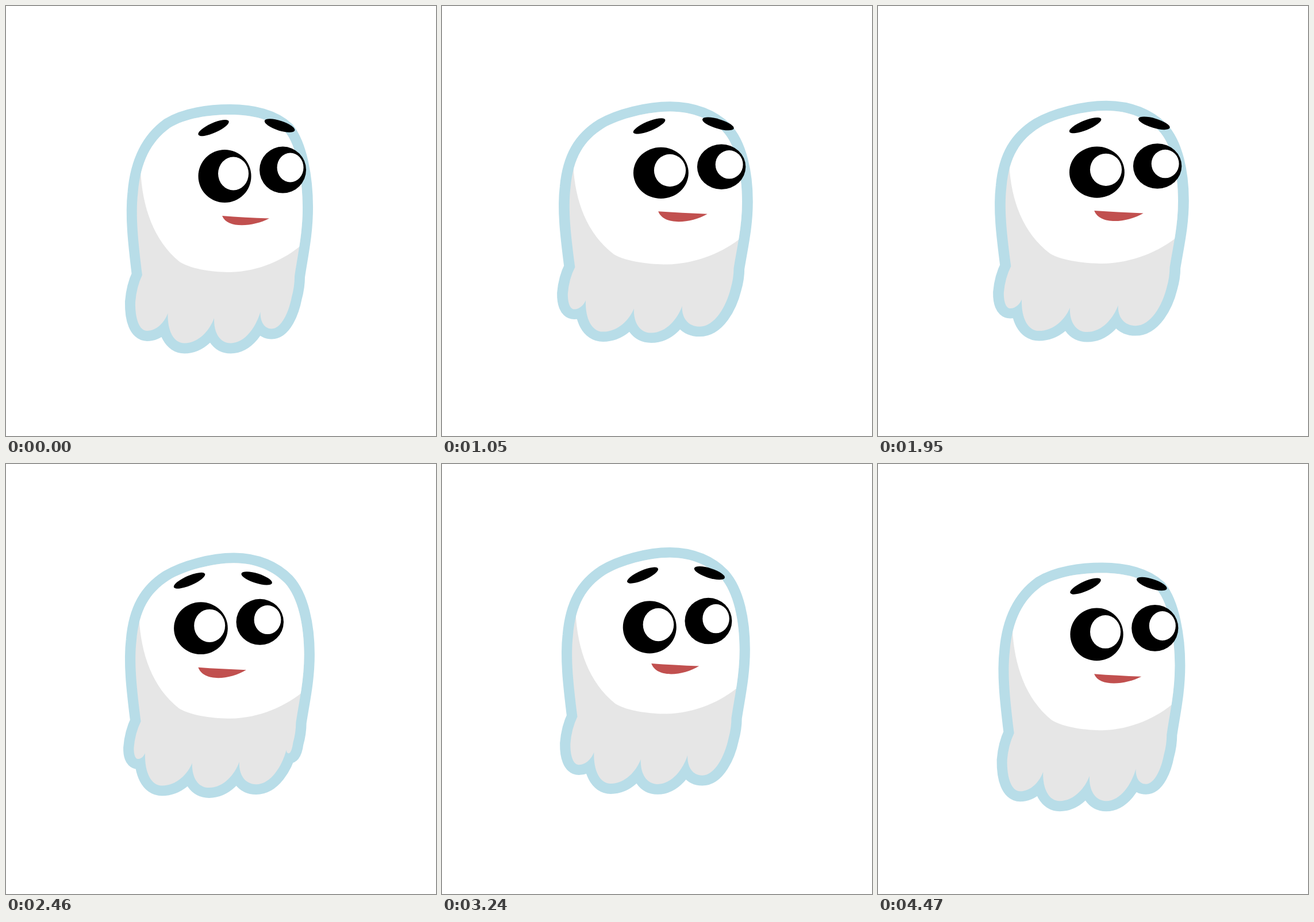
Animation of 748 by 748 pixels, one loop 4500 ms. Source, as an HTML page with a canvas:

```html
<!DOCTYPE html>
<html lang="en">
<head>
<meta charset="utf-8">
<title>Ghost</title>
<style>
html, body { margin: 0; width: 100%; height: 100%; overflow: hidden; background: #fff; }
canvas { display: block; width: 748px; height: 748px; }
</style>
</head>
<body>
<canvas id="stage" width="748" height="748"></canvas>
<script>
const ctx = document.getElementById('stage').getContext('2d');
const LOOP = 4500, STEP = 30;
const CENTER = 372, BASE = 573;
const BLUE = '#b8dde8', GRAY = '#e6e6e6', RED = '#c1504f';
const LANDINGS = [-15, 885, 1755, 2695, 3585, 4485, 5385];
const LEFT = [225, 515], RIGHT = [497, 506];

const mix = (a, b, u) => a + (b - a) * u;
const ease = (t, start, length) => {
  const u = Math.min(1, Math.max(0, (t - start) / length));
  return u * u * (3 - 2 * u);
};

// Height above the lowest point: one arc between each pair of landings.
function bounce(t) {
  const i = LANDINGS.findIndex((end, n) => n && t < end);
  const from = LANDINGS[i - 1];
  return 33 * Math.sin(Math.PI * (t - from) / (LANDINGS[i] - from)) - 1.7;
}

const squash = t => (1 - Math.cos(2 * Math.PI * (t + 8) / 300)) / 2;

// 0 = looking right, 1 = looking towards the middle.
const glance = (t, lag) => ease(t, 2040 + lag, 360) - ease(t, 3007 + lag, 360);

const cuspY = x => 543 - 0.0015 * (x - 357) ** 2;
const hemY = x => 588 - 0.0005 * (x - 350) ** 2 - 1.1e-7 * (x - 350) ** 4;

function hemPoints(t) {
  const points = [LEFT];
  const first = 362 - 80 * (t % 450) / 450;
  for (let k = -2; k <= 3; k++) {
    const x = first + 80.5 * k;
    if (x > LEFT[0] + 1 && x < RIGHT[0] - 1) points.push([x, cuspY(x)]);
  }
  points.push(RIGHT);
  return points;
}

// One scallop, traced from its right cusp to its left one.
function scallop([x0, y0], [x1, y1]) {
  const w = x1 - x0, xb = x0 + 0.36 * w;
  const yb = Math.min(hemY(xb), Math.max(y0, y1) + 0.54 * w);
  ctx.bezierCurveTo(x1 - 0.09 * w, mix(y1, yb, 0.47), xb + 0.31 * w, yb, xb, yb);
  ctx.bezierCurveTo(xb - 0.23 * w, yb, x0 - 0.01 * w, mix(y0, yb, 0.6), x0, y0);
}

// The head is flat-topped on landing (round = 0) and rounder in the air.
function bodyPath(t, round) {
  const leftY = mix(212, 219, round), top = 189;
  const peak = mix(390, 396, round);
  const rightX = mix(485, 483, round), rightY = mix(218, 224, round);
  ctx.beginPath();
  ctx.moveTo(237, 468);
  ctx.bezierCurveTo(230, 410, 225, 365, 229.5, 325);
  ctx.bezierCurveTo(234, 272, 252, mix(236, 241, round), 285, leftY);
  ctx.bezierCurveTo(312, leftY - 17, peak - 36, top, peak, top);
  ctx.bezierCurveTo(peak + 39, top, 464, rightY - 20, rightX, rightY);
  ctx.bezierCurveTo(506, rightY + 26, 516, 300, 516, 350);
  ctx.bezierCurveTo(516, 395, 508, 430, 502, 470);
  ctx.quadraticCurveTo(502, 488, ...RIGHT);
  const points = hemPoints(t);
  for (let i = points.length - 1; i > 0; i--) scallop(points[i - 1], points[i]);
  ctx.quadraticCurveTo(227, 489, 237, 468);
  ctx.closePath();
}

function drawBody(t, round) {
  bodyPath(t, round);
  ctx.lineWidth = 36;
  ctx.lineJoin = 'round';
  ctx.strokeStyle = BLUE;
  ctx.stroke();
  ctx.fillStyle = GRAY;
  ctx.fill();
  ctx.save();
  ctx.clip();
  ctx.beginPath();
  ctx.moveTo(200, 285);
  ctx.lineTo(234, 285);
  ctx.bezierCurveTo(237, 350, 257, 408, 302, 445);
  ctx.bezierCurveTo(324, 459, 365, 463, 390, 463);
  ctx.bezierCurveTo(440, 462, 485, 441, 516, 414);
  ctx.lineTo(560, 414);
  ctx.lineTo(560, 150);
  ctx.lineTo(200, 150);
  ctx.fillStyle = '#fff';
  ctx.fill();
  ctx.restore();
}

function oval(x, y, rx, ry, color, degrees = 0) {
  ctx.beginPath();
  ctx.ellipse(x, y, rx, ry, degrees * Math.PI / 180, 0, 2 * Math.PI);
  ctx.fillStyle = color;
  ctx.fill();
}

function facePart(u, dip, sink, draw) {
  ctx.save();
  ctx.translate(-41 * u, sink + 4 * u + dip * 4 * u * (1 - u));
  draw();
  ctx.restore();
}

function drawEyes() {
  oval(380.5, 296, 46, 46, '#000');
  oval(395.5, 291.5, 26.5, 29, '#fff');
  oval(481.5, 285, 40.5, 40.5, '#000');
  oval(494.5, 281, 23, 25.5, '#fff');
}

function drawBrows() {
  oval(361, 212, 29, 8.5, '#000', -24);
  oval(476, 208, 27.5, 8.5, '#000', 18);
}

function drawMouth(open) {
  ctx.beginPath();
  ctx.moveTo(376, 365);
  ctx.quadraticCurveTo(415, 368, 458, 369.5);
  ctx.bezierCurveTo(430, 384 + open, 385, 388 + open, 376, 365);
  ctx.fillStyle = RED;
  ctx.fill();
}

function draw(t) {
  const height = bounce(t), s = squash(t);
  const round = Math.min(1, Math.max(0, height / 18));
  const look = glance(t, 0), eyeLook = glance(t, 45), sink = 0.18 * height;
  ctx.fillStyle = '#fff';
  ctx.fillRect(0, 0, 748, 748);
  ctx.save();
  ctx.translate(CENTER, BASE - height);
  ctx.scale(1 + 0.042 * s, 1 - 0.03 * s);
  ctx.translate(-CENTER, -BASE);
  drawBody(t, round);
  facePart(look, 2, sink, drawBrows);
  facePart(eyeLook, 8, sink, drawEyes);
  facePart(look, 4, sink, () => drawMouth(3 * round));
  ctx.restore();
}

const begin = performance.now();
function tick() {
  const t = (performance.now() - begin) % LOOP;
  draw(Math.floor(t / STEP) * STEP);
  requestAnimationFrame(tick);
}
tick();
</script>
</body>
</html>
```
